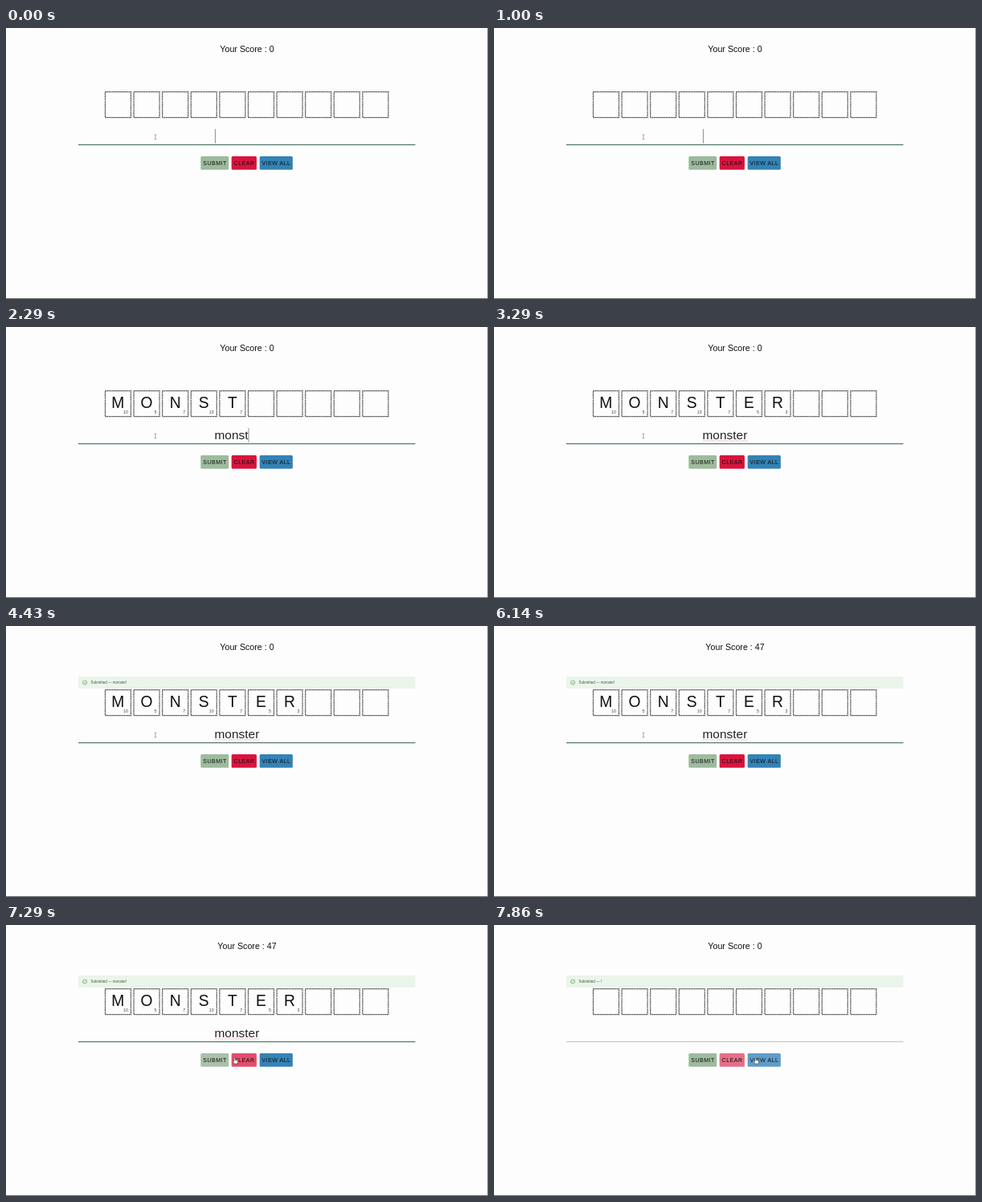
Recreate the animation shown at these times as an HTML page. Size 600 by 338 pixels, loop 8000 ms.

```html
<!DOCTYPE html>
<html lang="en">
<head>
<meta charset="utf-8">
<title>Word score</title>
<style>
  html, body { margin: 0; width: 100%; height: 100%; overflow: hidden; background: #fdfdfd; }
  svg { display: block; width: 100vw; height: 100vh; }
  text { font-family: "Liberation Sans", Arial, sans-serif; fill: #111; }
  .mid { text-anchor: middle; }
  .score { font-size: 10.7px; }
  .letter { font-size: 19.3px; }
  .points { font-size: 5.3px; text-anchor: end; fill: #444; }
  .typed { font-size: 15.5px; fill: #222; }
  .label { font-size: 7.1px; letter-spacing: .45px; }
  .note { font-size: 4.5px; fill: #3f5a40; }
  .cell { fill: none; stroke: #222; stroke-width: 1.2; stroke-dasharray: 1.3 .8; }
</style>
</head>
<body>
<svg id="stage" viewBox="0 0 600 338"></svg>
<script>
const LOOP = 8000;
const stage = document.getElementById('stage');

function add(tag, attrs, parent = stage, content = '') {
  const el = document.createElementNS('http://www.w3.org/2000/svg', tag);
  for (const key in attrs) el.setAttribute(key, attrs[key]);
  el.textContent = content;
  parent.append(el);
  return el;
}
const show = (el, on) => el.setAttribute('visibility', on ? 'visible' : 'hidden');

// Value of the last step that has started.
function at(steps, t) {
  let value = steps[0][1];
  for (const [time, next] of steps) if (t >= time) value = next;
  return value;
}

const WORD = 'monster';
const POINTS = [10, 5, 7, 10, 7, 5, 3];
const TYPED = [[0, 0], [1290, 1], [1710, 2], [1860, 3], [2000, 4], [2140, 5], [2430, 6], [2570, 7], [7570, 0]];
const SCORE = [[0, 0], [4570, 47], [7570, 0]];
const CARET = [[0, 1], [430, 0], [940, 1], [3050, 0], [3565, 1], [4085, 0], [4600, 1],
  [5115, 0], [5630, 1], [6135, 0], [6660, 1], [7175, 0]];
const POINTER = [[0, [186, 136, 'beam']], [6430, [196, 118, 'beam']], [6570, [222, 52, 'arrow']],
  [6710, [236, 68, 'arrow']], [6860, [244, 124, 'beam']], [7000, [252, 173, 'hand']],
  [7140, [270, 171, 'hand']], [7290, [285, 169, 'hand']], [7710, [306, 169, 'hand']], [7860, [326, 169, 'hand']]];
const BUTTONS = [
  { label: 'SUBMIT', x: 242.3, w: 35, fill: [[0, '#9dbb9d'], [7000, '#b2c6b2'], [7290, '#a9c0a9'], [7430, '#9dbb9d']] },
  { label: 'CLEAR', x: 280.7, w: 31.3, fill: [[0, '#d9143e'], [7140, '#e03a5c'], [7290, '#e34e6d'], [7710, '#e66f88']] },
  { label: 'VIEW ALL', x: 315.7, w: 41.2, fill: [[0, '#3482b6'], [7860, '#5e9dc9']] }
];

add('rect', { width: 600, height: 338, fill: '#fdfdfd' });
add('path', { d: 'M599.5 0V338', stroke: '#999' });
add('path', { d: 'M0 337.5H600', stroke: '#666' });

const score = add('text', { x: 300, y: 30.2, class: 'score mid' });

const alertBox = add('g', {});
add('rect', { x: 90, y: 63, width: 419.5, height: 15, rx: 1, fill: '#ebf5eb' }, alertBox);
add('path', {
  d: 'M100.7 70.5a2.6 2.6 0 1 1-5.2 0a2.6 2.6 0 0 1 5.2 0M96.8 70.5l1 1l1.8-2',
  fill: 'none', stroke: '#62a465', 'stroke-width': .7
}, alertBox);
const note = add('text', { x: 105.4, y: 72.2, class: 'note' }, alertBox);

const tiles = Array.from({ length: 10 }, (_, i) => {
  const x = 123.5 + i * 35.6;
  add('rect', { x, y: 79.7, width: 32, height: 32, class: 'cell' });
  const tile = add('g', {});
  if (i < WORD.length) {
    add('text', { x: x + 15.9, y: 100.6, class: 'letter mid' }, tile, WORD[i].toUpperCase());
    add('text', { x: x + 28.4, y: 107.6, class: 'points' }, tile, POINTS[i]);
  }
  return tile;
});

const typed = add('text', { y: 140.3, class: 'typed' });
const squiggle = add('path', { d: 'M260 141.9H316', stroke: '#dc9a9a', 'stroke-width': .8, 'stroke-dasharray': '1.2 .8' });
const caret = add('path', { stroke: '#777', 'stroke-width': .8 });
const line = add('path', { d: 'M90 145.6H509.5' });

for (const b of BUTTONS) {
  b.rect = add('rect', { x: b.x, y: 160, width: b.w, height: 16.8, rx: 1.5 });
  add('text', { x: b.x + b.w / 2 + .2, y: 170.7, class: 'label mid' }, stage, b.label);
}

const pointers = {
  beam: add('path', { d: 'M-1.4-2.8H1.4M0-2.8V2.8M-1.4 2.8H1.4', fill: 'none', stroke: '#7d877d', 'stroke-width': .7 }),
  arrow: add('path', { d: 'M0-3V4L1.6 2.6L2.8 5L3.8 4.5L2.7 2.2H4.8Z', fill: '#222', stroke: '#fff', 'stroke-width': .4 }),
  hand: add('path', {
    d: 'M-1-3Q0-4 .5-3V-.6L3 0Q4 .4 3.5 2L2.8 4H-.6L-2.7 1.3Q-2.6 .2-1 1.2Z',
    fill: '#fff', stroke: '#333', 'stroke-width': .5
  })
};

function draw(t) {
  const count = at(TYPED, t);
  const cleared = t >= 7570;
  const word = WORD.slice(0, count);
  const left = count < 4 ? 257 : 259.4;

  score.textContent = 'Your Score : ' + at(SCORE, t);
  tiles.forEach((tile, i) => show(tile, i < count));
  show(alertBox, t >= 3860);
  note.textContent = `Submitted — ${word}!`;

  typed.setAttribute('x', left);
  typed.textContent = word;
  show(squiggle, t >= 2430 && !cleared);
  const caretX = count ? left + typed.getComputedTextLength() + .4 : 260.5;
  caret.setAttribute('d', `M${caretX} 126V144`);
  show(caret, at(CARET, t) && !cleared);
  line.setAttribute('stroke', cleared ? '#b8bcb8' : '#557a6c');
  line.setAttribute('stroke-width', cleared ? .9 : 1.2);

  for (const b of BUTTONS) b.rect.setAttribute('fill', at(b.fill, t));

  const [x, y, kind] = at(POINTER, t);
  for (const name in pointers) {
    show(pointers[name], name === kind);
    pointers[name].setAttribute('transform', `translate(${x} ${y})`);
  }
}

const start = performance.now();
function tick() {
  draw((performance.now() - start) % LOOP);
  requestAnimationFrame(tick);
}
tick();
</script>
</body>
</html>
```
